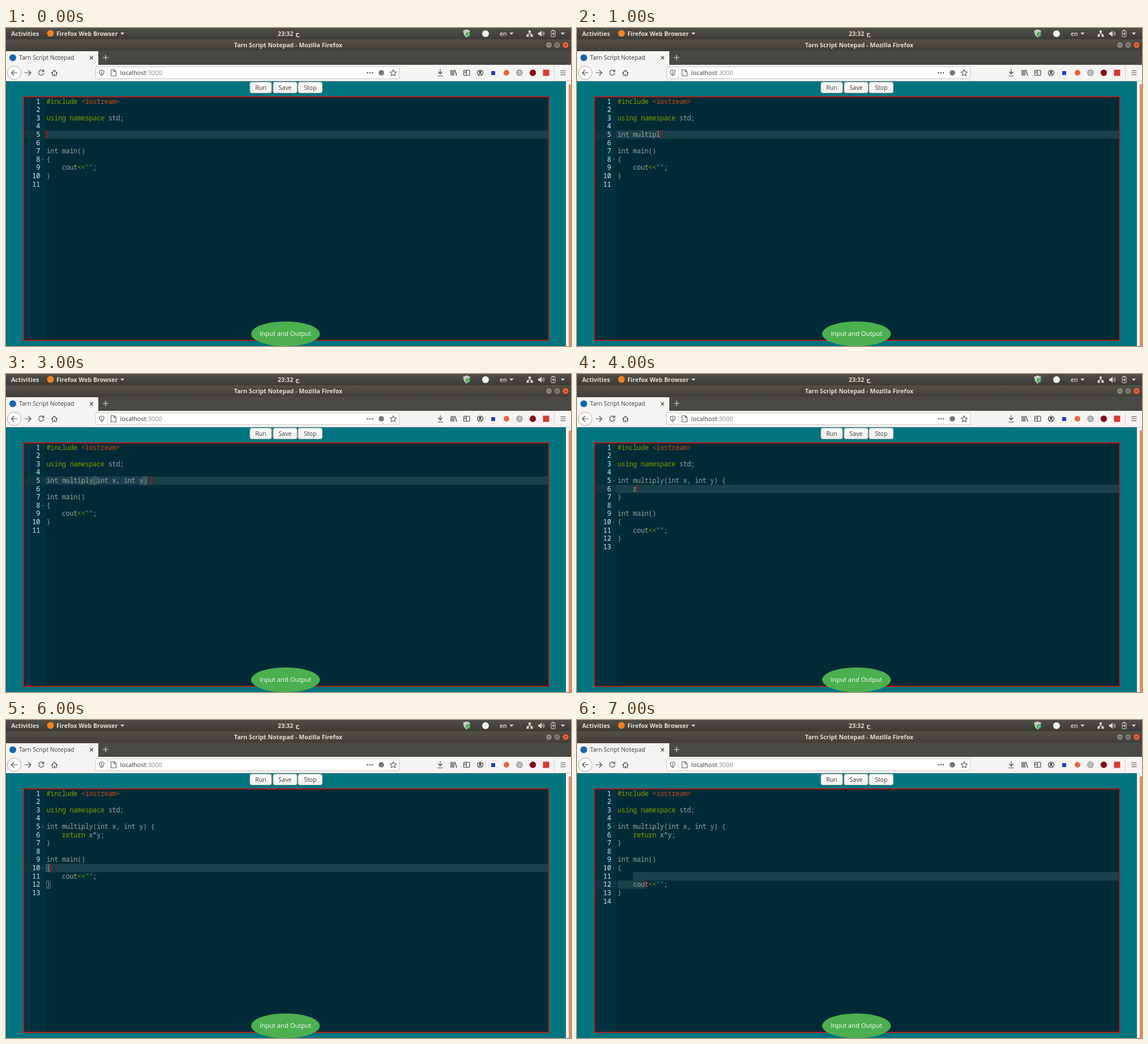
Write an HTML page that moves like this. It is 998 by 561 pixels and loops after 8000 ms.

```html
<!DOCTYPE html>
<html lang="en">
<head>
<meta charset="utf-8">
<title>Tarn Script Notepad</title>
<style>
  html, body { margin: 0; width: 100%; height: 100%; overflow: hidden; background: #007580; }
  svg { display: block; width: 998px; height: 561px; }
  text { font-family: "Open Sans", "Noto Sans", "DejaVu Sans", sans-serif; white-space: pre; }
  .bar { font-size: 10.6px; font-weight: 700; fill: #e2ddd3; }
  .ui { font-size: 10.5px; fill: #3a3a3a; }
  .code text { font-family: "Noto Sans Mono", "DejaVu Sans Mono", monospace; font-size: 12px; letter-spacing: -.38px; fill: #93a1a1; }
  .code .num { fill: #d0edf7; text-anchor: end; }
  .kw { fill: #859900; }
  .inc { fill: #cb4b16; }
  .str { fill: #2aa198; }
  .icon { fill: none; stroke: #4a4a4a; stroke-width: 1.2; stroke-linecap: round; stroke-linejoin: round; }
  .tray { fill: #dfdbd2; }
</style>
</head>
<body>
<svg viewBox="0 0 998 561">
  <defs>
    <linearGradient id="top" x2="0" y2="1">
      <stop stop-color="#504e47"/><stop offset="1" stop-color="#3d3b36"/>
    </linearGradient>
    <linearGradient id="title" x2="0" y2="1">
      <stop stop-color="#535047"/><stop offset="1" stop-color="#403e39"/>
    </linearGradient>
    <linearGradient id="btn" x2="0" y2="1">
      <stop stop-color="#fff"/><stop offset="1" stop-color="#efeeec"/>
    </linearGradient>
  </defs>

  <!-- desktop bar -->
  <rect width="998" height="20" fill="url(#top)"/>
  <g class="bar">
    <text x="9" y="13.5">Activities</text>
    <text x="89" y="13.5">Firefox Web Browser</text>
    <text x="480" y="13.5">23:32</text>
    <text x="511" y="13" style="font-family:'DejaVu Sans',sans-serif">ج</text>
    <text x="872" y="13.5" style="font-weight:600">en</text>
  </g>
  <circle cx="78.5" cy="9.5" r="6" fill="#f58220"/>
  <g class="tray">
    <path d="M202 8h7l-3.500 4zM889.500 8h7l-3.500 4zM980 8h7l-3.500 4z"/>
    <path d="M813.500 2.500l6 2q0 8-6 12.500q-6-4.500-6-12.500z" fill="#c9c9c5"/>
    <circle cx="816" cy="11.500" r="4" fill="#36a852"/>
    <path d="M814 11.500l1.500 1.500 2.500-3" fill="none" stroke="#fff"/>
    <circle cx="847" cy="10" r="6" fill="#f4f4f4"/>
    <path d="M923 4.500h4v4h-4zM919.500 11.500h4v4h-4zM926.500 11.500h4v4h-4z"/>
    <path d="M925 8v2.500M921.500 12v-1.500h7v1.500" fill="none" stroke="#dfdbd2"/>
    <path d="M940 8h2.500l3.500-3.500v11l-3.500-3.500H940z"/>
    <path d="M947.500 7.500q1.500 2.500 0 5M949.500 6q2.500 4 0 8" fill="none" stroke="#dfdbd2"/>
    <rect x="963" y="5" width="7" height="10.500" rx="1" fill="none" stroke="#dfdbd2"/>
    <path d="M965 3.500h3v1.500h-3zM967.500 6.500l-3 4.500h2l-.5 3 3-4.500h-2z"/>
  </g>

  <!-- window title and tab strip -->
  <rect y="20" width="998" height="21" fill="url(#title)"/>
  <rect y="40" width="998" height="25" fill="#4b4943"/>
  <text class="bar" x="498.500" y="33.500" text-anchor="middle">Tarn Script Notepad - Mozilla Firefox</text>
  <g stroke="#33312d" stroke-width=".8">
    <circle cx="959" cy="30" r="5.500" fill="#8b8880"/>
    <circle cx="973.500" cy="30" r="5.500" fill="#8b8880"/>
    <circle cx="988.500" cy="30" r="5.700" fill="#ee6038"/>
    <path d="M956.500 30h5M971.500 28h4v4h-4zM986.500 28l4 4m0-4l-4 4" fill="none"/>
  </g>
  <rect y="41" width="163" height="25" fill="#f5f4f2"/>
  <circle cx="12" cy="52.500" r="6" fill="#1766ac"/>
  <text class="ui" x="23" y="56.200">Tarn Script Notepad</text>
  <path class="icon" d="M148.500 50l5 5m0-5l-5 5"/>
  <path class="icon" style="stroke:#e2ddd3" d="M171.500 52h9M176 47.500v9"/>

  <!-- navigation bar -->
  <rect y="65" width="998" height="29" fill="#f5f4f2"/>
  <path d="M0 93.500h998" stroke="#d2cfca"/>
  <rect x="158.500" y="68.500" width="536" height="21" rx="2" fill="#fff" stroke="#c9c6c1"/>
  <circle cx="14.500" cy="79" r="12" fill="#fdfdfd" stroke="#aaa7a2"/>
  <g class="icon">
    <path d="M20 79H9.500m4.500-4.500L9.500 79l4.500 4.500M33.500 79H44m-4.500-4.500L44 79l-4.500 4.500"/>
    <path d="M66 76a4.600 4.600 0 1 0 .7 4M66.700 73.500v3.500h-3.500"/>
    <path d="M80.500 79.500l5-5 5 5M82 78.500v5.500h7v-5.500M85.500 84v-3"/>
    <path d="M169 74l4.200 1.500q0 6-4.200 8.500q-4.200-2.500-4.200-8.500zM169 76v6" stroke="#666"/>
    <path d="M179.500 70v18" stroke="#ddd"/>
    <path d="M185.500 73.500h5.500l3.500 3.500v7.500h-9zM191 73.500V77h3.500" stroke="#666"/>
    <circle cx="663" cy="79" r="4.800" stroke="none" fill="#777"/>
    <path d="M684 73.500l1.600 3.700 4 .4-3 2.700.9 4-3.500-2.100-3.500 2.100.9-4-3-2.700 4-.4z" stroke="#666"/>
    <path d="M767 73v8m-3.500-3.500L767 81l3.500-3.500M763 84.500h8"/>
    <path d="M786 74.500v9M788.500 74.500v9M791 74.500v9M793 74.500l3 9" stroke-width="1.400"/>
    <rect x="808.500" y="74.500" width="10.500" height="9" rx="1"/>
    <path d="M813.500 74.500v9M810 77h2M810 79h2"/>
    <circle cx="837.500" cy="79" r="5"/>
    <circle cx="837.500" cy="77.500" r="1.700" fill="#4a4a4a"/>
    <path d="M834.500 82q3-3 6 0"/>
    <circle cx="907" cy="79" r="5.200" fill="#aaa" stroke="#888"/>
    <path d="M902 79h10M907 74v10M903 76.500h8M903 81.500h8" stroke="#ddd" stroke-width=".7"/>
    <path d="M968.500 68v22" stroke="#dad7d2"/>
    <path d="M980 75.500h8M980 79h8M980 82.500h8"/>
  </g>
  <g fill="#555">
    <circle cx="638.500" cy="79" r="1.300"/><circle cx="642.800" cy="79" r="1.300"/><circle cx="647.100" cy="79" r="1.300"/>
  </g>
  <rect x="857" y="76" width="7" height="7" fill="#2540c8"/>
  <circle cx="884" cy="79" r="5" fill="#e9663d"/>
  <circle cx="930.500" cy="79" r="5.700" fill="#850a16"/>
  <rect x="948.500" y="73.500" width="11" height="11" fill="#d83a32"/>
  <text class="ui" x="201.500" y="83" style="font-size:11px">localhost<tspan fill="#8a8a8a">:3000</tspan></text>

  <!-- page -->
  <rect y="94" width="998" height="467" fill="#007580"/>
  <rect x="989" y="94" width="9" height="467" fill="#f4f2f0"/>
  <rect x="994" y="99.500" width="4" height="462" fill="#ef8763"/>
  <g id="buttons"></g>
  <rect x="31" y="121.500" width="927.500" height="429.500" fill="#002b36"/>
  <rect x="31" y="121.500" width="38.500" height="429.500" fill="#01313f"/>
  <g class="code" id="code"></g>
  <rect x="31" y="121.500" width="927.500" height="429.500" fill="none" stroke="#c8140f" stroke-width="1.800"/>
  <ellipse cx="493.700" cy="539.500" rx="60.700" ry="21.800" fill="#4caf50"/>
  <text x="493.700" y="543" text-anchor="middle" font-size="11.250" fill="#fff">Input and Output</text>
</svg>
<script>
const STEP = 1000, LEFT = 71.5, TOP = 122.3, CW = 6.82, LH = 14.61, RIGHT = 957.6;
const colX = c => LEFT + c * CW;
const rowY = r => TOP + (r - 1) * LH;
const esc = s => s.replace(/&/g, "&amp;").replace(/</g, "&lt;").replace(/>/g, "&gt;");
const rect = (x, y, w, h, attrs) => `<rect x="${x}" y="${y}" width="${w}" height="${h}" ${attrs}/>`;

const head = ["#include <iostream>", "", "using namespace std;", ""];
const main = ["", "int main()", "{", '    cout<<"";', "}", ""];
const sign = "int multiply(int x, int y) ";
const typing = (n, close = "") => [...head, sign.slice(0, n) + close, ...main];
const body = (n, rest = main) =>
  [...head, sign + "{", "    " + "return x*y;".slice(0, n), "}", ...rest];
const split = [...main.slice(0, 3), "    ", ...main.slice(3)];

// at: cursor [row, col]; pair: matched brackets; sel: selected spans [row, from, to]
const states = [
  { lines: typing(0), at: [5, 0] },
  { lines: typing(11), at: [5, 11] },
  { lines: typing(19, ")"), at: [5, 19] },
  { lines: typing(27), at: [5, 27], pair: [[5, 12], [5, 25]] },
  { lines: body(1), at: [6, 5] },
  { lines: body(11), at: [6, 15] },
  { lines: body(11), at: [10, 1], pair: [[10, 0], [12, 0]] },
  { lines: body(11, split), at: [12, 7], sel: [[11, 4], [12, 0, 7]] }
];

function paint(line) {
  const rule = /(#include|using|namespace|return|<<)|(<\w+>)|("")/g;
  let out = "", end = 0;
  for (const m of line.matchAll(rule)) {
    const kind = m[1] ? "kw" : m[2] ? "inc" : "str";
    out += esc(line.slice(end, m.index)) + `<tspan class="${kind}">${esc(m[0])}</tspan>`;
    end = m.index + m[0].length;
  }
  return out + esc(line.slice(end));
}

function editor({ lines, at: [row, col], pair = [], sel }) {
  const light = 'fill="#fff" fill-opacity=".1"';
  let out = rect(32, rowY(row), 37.5, LH, 'fill="#0d3440"');
  if (sel) {
    for (const [r, a, b] of sel)
      out += rect(colX(a), rowY(r), (b === undefined ? RIGHT : colX(b)) - colX(a), LH, light);
  } else {
    out += rect(69.5, rowY(row), RIGHT - 69.5, LH, light);
  }
  lines.forEach((line, i) => {
    const y = rowY(i + 1) + 11.3;
    out += `<text class="num" x="60" y="${y}">${i + 1}</text>`;
    if (line) out += `<text x="${LEFT}" y="${y}">${paint(line)}</text>`;
    if (line.endsWith("{")) out += `<path d="M63 ${y - 4.5}h3.600l-1.800 2.200z" fill="#54717a"/>`;
  });
  for (const [r, c] of pair)
    out += rect(colX(c), rowY(r) + .5, CW, LH - 1, 'rx="1" fill="none" stroke="#7d8c8e" stroke-width=".8"');
  return out + rect(colX(col) - .2, rowY(row), 1.5, LH, 'fill="#d30102"');
}

document.getElementById("buttons").innerHTML =
  [["Run", 431, 38], ["Save", 472, 42], ["Stop", 516, 42.5]].map(([label, x, w]) =>
    rect(x, 95.5, w, 19, 'rx="3" fill="url(#btn)" stroke="#c4beb6"') +
    `<text class="ui" x="${x + w / 2}" y="108.800" text-anchor="middle">${label}</text>`).join("");

const code = document.getElementById("code");
let shown = -1;
function draw(now) {
  const i = Math.floor(now / STEP) % states.length;
  if (i !== shown) code.innerHTML = editor(states[shown = i]);
}
const start = performance.now();
function tick() {
  draw(performance.now() - start);
  requestAnimationFrame(tick);
}
tick();
</script>
</body>
</html>
```
